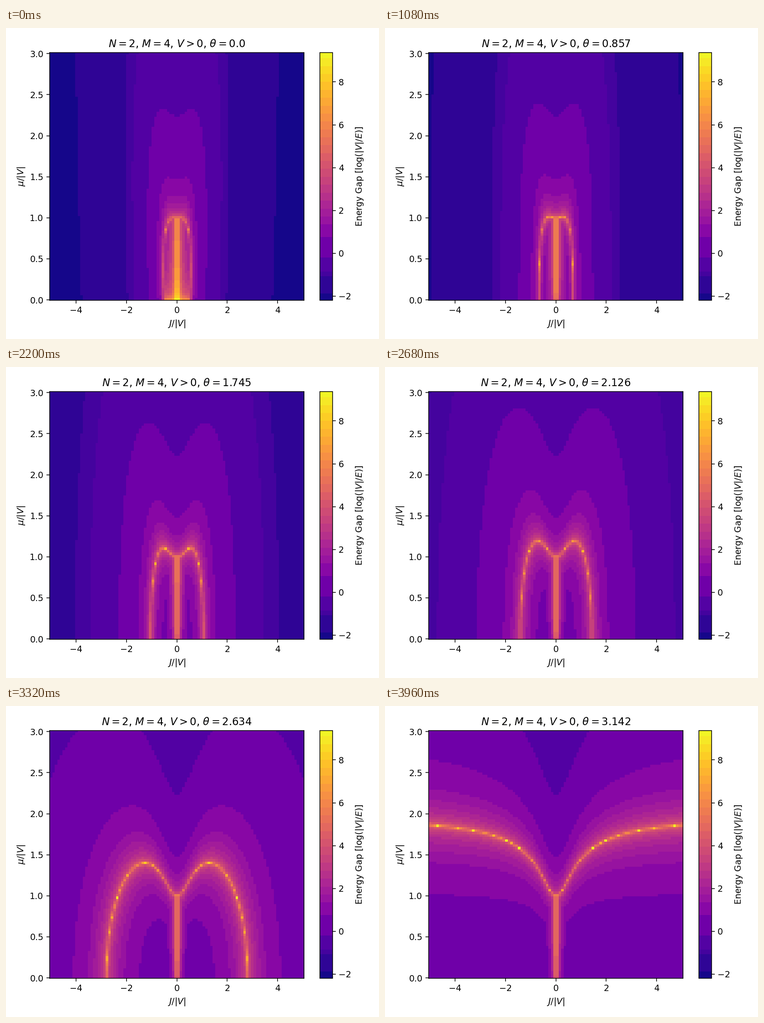
These frames come from a looping animation (820 px wide and 683 px high, 4000 ms). A matplotlib script:

```python
import numpy as np
import matplotlib.pyplot as plt
from matplotlib.animation import FuncAnimation
from matplotlib.colors import ListedColormap

W, H, DPI = 820, 683, 136.6
FRAMES, SITES, GRID = 100, 4, 100

# Two particles on a ring of four levels: hopping J with flux theta,
# neighbour exchange V = 1 and a well of depth mu on level 0.
J = np.linspace(-5, 5, GRID)
MU = np.linspace(0.01, 3, GRID)
THETA = np.linspace(0, np.pi, FRAMES)


def two_body(op):
    eye = np.eye(SITES)
    return np.kron(op, eye) + np.kron(eye, op)


def exchange():
    x = np.zeros((SITES**2, SITES**2))
    for a in range(SITES):
        for step in (1, -1):
            b = (a + step) % SITES
            x[b * SITES + a, a * SITES + b] = 1
    return x


def sector_basis(sign):
    """Pair states that are even (+1) or odd (-1) under particle swap."""
    cols = []
    for a in range(SITES):
        for b in range(a, SITES):
            v = np.zeros((SITES, SITES))
            v[a, b] += 1
            v[b, a] += sign
            if v.any():
                cols.append(v.ravel() / np.linalg.norm(v))
    return np.array(cols).T


# Reflection-adapted levels make every operator real.
r = np.sqrt(0.5)
levels = np.array([[1, 0, 0, 0],
                   [0, 0, r, 1j * r],
                   [0, 1, 0, 0],
                   [0, 0, r, -1j * r]])
shift = np.roll(np.eye(SITES), 1, axis=0)
well = np.diag([1.0, 0, 0, 0])
operators = [two_body(shift + shift.T), two_body(1j * (shift - shift.T)),
             exchange(), two_body(well)]


def project(sign):
    q = np.kron(levels, levels) @ sector_basis(sign)
    return [(q.conj().T @ op @ q).real for op in operators]


sectors = [project(1), project(-1)]
j_half = J[GRID // 2:][None, :, None, None]
mu_col = MU[:, None, None, None]


def gap_map(theta):
    """log(|V|/E) over the grid; the picture is even in J."""
    c, s = np.cos(theta / SITES), np.sin(theta / SITES)
    low = []
    for hop_c, hop_s, swap, pot in sectors:
        h = j_half * (c * hop_c + s * hop_s) + swap - mu_col * pot
        low.append(np.linalg.eigvalsh(h)[..., :2])
    low = np.sort(np.concatenate(low, axis=-1), axis=-1)
    half = -np.log(np.maximum(low[..., 1] - low[..., 0], 1e-12))
    return np.hstack([half[:, ::-1], half])


def banded_plasma(vmin, vmax, n=1024):
    inner = [-1.884, -1.07, -0.85, -0.21, 0.75]
    edges = np.concatenate([[vmin], inner, np.linspace(1.35, 9.11, 22), [vmax]])
    t = (edges - vmin) / (vmax - vmin)
    mid = (t[1:] + t[:-1]) / 2
    band = np.searchsorted(t[1:-1], (np.arange(n) + 0.5) / n)
    return ListedColormap(plt.get_cmap("plasma")(mid[band]))


def place(x0, y0, x1, y1):
    return [x0 / W, 1 - y1 / H, (x1 - x0) / W, (y1 - y0) / H]


def title(theta):
    return rf"$N=2$, $M=4$, $V>0$, $\theta={round(float(theta), 3)}$"


first = gap_map(THETA[0])
vmin, vmax = first.min(), first.max()
dj, dmu = (J[1] - J[0]) / 2, (MU[1] - MU[0]) / 2

# The small margin keeps the pixel size from rounding down.
fig = plt.figure(figsize=((W + 0.01) / DPI, (H + 0.01) / DPI), dpi=DPI,
                 facecolor="white")
ax = fig.add_axes(place(95.8, 53.6, 655.2, 598))
cax = fig.add_axes(place(690.4, 53.6, 717.6, 598))

image = ax.imshow(first, origin="lower", aspect="auto", interpolation="nearest",
                  extent=(J[0] - dj, J[-1] + dj, MU[0] - dmu, MU[-1] + dmu),
                  cmap=banded_plasma(vmin, vmax), vmin=vmin, vmax=vmax)
ax.set_xlabel(r"$J/|V|$")
ax.set_ylabel(r"$\mu/|V|$")
heading = ax.set_title(title(THETA[0]))
fig.colorbar(image, cax=cax, label=r"Energy Gap [$\log(|V|/E)$]")


def update(i):
    image.set_data(first if i == 0 else gap_map(THETA[i]))
    heading.set_text(title(THETA[i]))
    return image, heading


anim = FuncAnimation(fig, update, frames=FRAMES, interval=40,
                     repeat=True, repeat_delay=0, blit=False)
plt.show()
```
